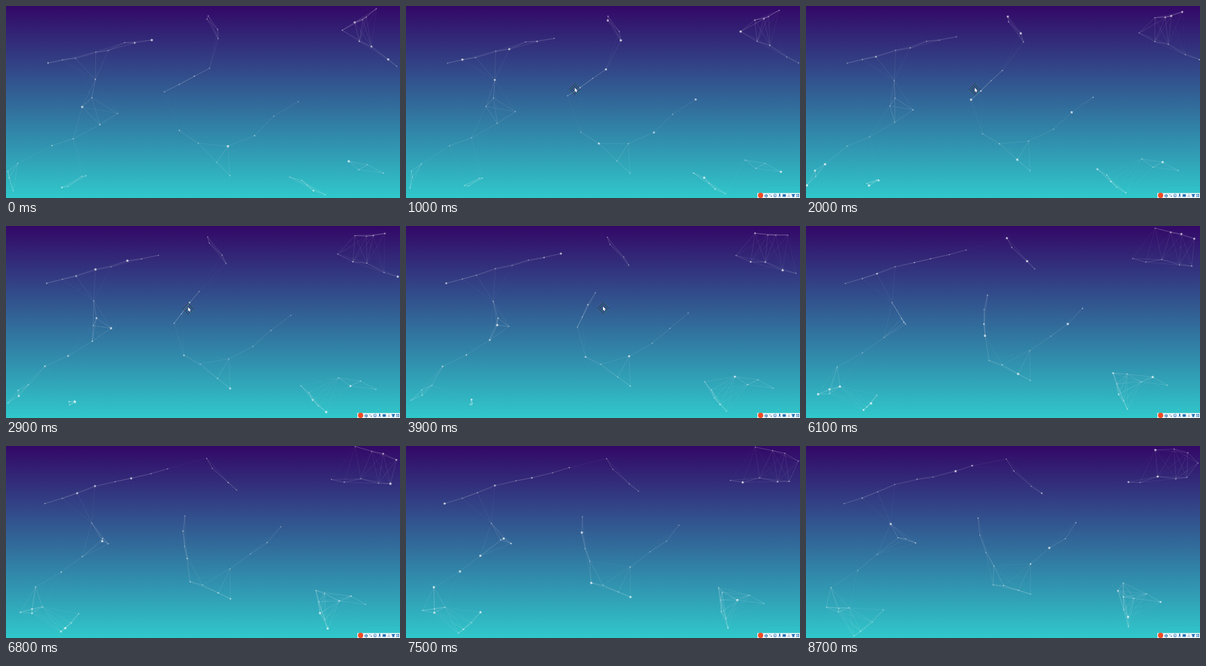
An HTML page with a canvas for the animation above (8.8 s loop, 600 by 293 pixels).

```html
<!DOCTYPE html>
<html lang="en">
<head>
<meta charset="utf-8">
<title>Constellation</title>
<style>
  html, body { margin: 0; width: 100%; height: 100%; overflow: hidden; }
  body { background: linear-gradient(#330867, #30c8cb); }
  canvas { display: block; width: 600px; height: 293px; }
</style>
</head>
<body>
<canvas id="sky" width="600" height="293"></canvas>
<script>
const W = 600, H = 293, LOOP = 8800, STEP = 100, TRAVEL = 8700;
const LINK = 74, PULSE = 4100, SCATTER = 16;
const ctx = document.getElementById('sky').getContext('2d');

let seed = 11;
const random = () => (seed = seed * 16807 % 2147483647) / 2147483647;
const mix = (a, b, k) => a + (b - a) * k;
const between = (p, q, k) => ({ x: mix(p.x, q.x, k), y: mix(p.y, q.y, k) });
const at = (x, y) => ({ x, y });

// Stars spaced along a line that drifts from one pair of end points to another;
// the inner stars stray a little from the line.
function chain(count, startA, startB, endA, endB) {
  return Array.from({ length: count }, (_, i) => {
    const k = i / (count - 1);
    const stray = SCATTER * Math.sin(Math.PI * k);
    const nudge = p => at(p.x + stray * (random() - 0.5), p.y + stray * (random() - 0.5));
    return {
      from: nudge(between(startA, startB, k)),
      to: nudge(between(endA, endB, k)),
      peak: random() * PULSE
    };
  });
}

const stars = [
  // left
  chain(8, at(64, 87), at(222, 52), at(58, 88), at(253, 30)),
  chain(3, at(136, 112), at(116, 154), at(129, 119), at(167, 148)),
  chain(4, at(170, 164), at(70, 213), at(140, 140), at(38, 216)),
  chain(4, at(18, 240), at(-11, 282), at(66, 247), at(31, 246)),
  chain(4, at(122, 259), at(85, 277), at(73, 290), at(118, 250)),
  // middle
  chain(4, at(308, 15), at(323, 50), at(305, 20), at(359, 72)),
  chain(4, at(310, 95), at(241, 131), at(262, 110), at(286, 183)),
  chain(4, at(264, 190), at(341, 259), at(285, 212), at(342, 226)),
  chain(4, at(338, 214), at(445, 146), at(342, 180), at(411, 117)),
  // right
  chain(4, at(531, 25), at(564, 4), at(532, -6), at(603, 26)),
  chain(5, at(512, 37), at(605, 92), at(491, 55), at(580, 48)),
  chain(4, at(522, 237), at(575, 255), at(475, 221), at(540, 238)),
  chain(5, at(432, 261), at(486, 288), at(483, 209), at(491, 276))
].flat();

const bounce = (v, max) => max - Math.abs(max - Math.abs(v));

function place(star, t) {
  const p = between(star.from, star.to, t / TRAVEL);
  const wave = (1 + Math.cos((t - star.peak) / PULSE * 2 * Math.PI)) / 2;
  return { x: bounce(p.x, W), y: bounce(p.y, H), glow: wave ** 5 };
}

function drawLinks(points) {
  ctx.strokeStyle = '#fff';
  ctx.lineWidth = 0.5;
  points.forEach((a, i) => {
    for (const b of points.slice(i + 1)) {
      const d = Math.hypot(a.x - b.x, a.y - b.y);
      if (d >= LINK) continue;
      ctx.globalAlpha = 0.45 * (1 - d / LINK);
      ctx.beginPath();
      ctx.moveTo(a.x, a.y);
      ctx.lineTo(b.x, b.y);
      ctx.stroke();
    }
  });
}

function drawStar({ x, y, glow }) {
  const radius = 1.2 + 1.3 * glow;
  ctx.globalAlpha = 0.45 + 0.3 * glow;
  ctx.fillStyle = '#fff';
  ctx.beginPath();
  for (let i = 0; i < 10; i++) {
    const angle = i * Math.PI / 5 - Math.PI / 2;
    const r = i % 2 ? radius * 0.5 : radius;
    ctx.lineTo(x + r * Math.cos(angle), y + r * Math.sin(angle));
  }
  ctx.fill();
}

function drawPointer(t) {
  const k = Math.min(1, Math.max(0, (t - 2000) / 1900));
  const { x, y } = between(at(257, 127), at(300, 125), k);
  const colours = ['#10131f', '#2c9a58', '#10131f', '#8a5a9c'];
  ctx.globalAlpha = 0.7;
  for (let j = -8; j <= 8; j += 2) {
    for (let i = -8; i <= 8; i += 2) {
      if (Math.hypot(i, j) > 8.3) continue;
      ctx.fillStyle = colours[(i + j + 32) / 2 % 4];
      ctx.fillRect(x + i - 0.6, y + j - 0.6, 1.2, 1.2);
    }
  }
  ctx.globalAlpha = 1;
  ctx.fillStyle = '#fff';
  ctx.fill(new Path2D(`M${x} ${y - 2}v6l1.4-1.2 1 2 1-.5-1-2h1.8z`));
}

function drawToolbar() {
  const box = (x, y, w, h) => ctx.fillRect(x, y, w, h);
  const dot = (x, y, r) => {
    ctx.beginPath();
    ctx.arc(x, y, r, 0, 7);
    ctx.fill();
  };
  ctx.globalAlpha = 1;
  ctx.fillStyle = '#f5f9fc';
  box(535, 285.5, 65, 7.5);
  ctx.fillStyle = '#f04a23';
  dot(540, 289, 4);
  ctx.fillStyle = ctx.strokeStyle = '#2373b5';
  ctx.font = 'bold 6px "Noto Sans CJK SC", "Noto Sans CJK", sans-serif';
  ctx.fillText('中', 545.5, 291.5);
  // punctuation, face, microphone, keyboard
  dot(554, 288, 0.8);
  box(555.5, 289.5, 1.5, 1.5);
  ctx.lineWidth = 0.8;
  ctx.beginPath();
  ctx.arc(562, 289.2, 2.2, 0, 7);
  ctx.stroke();
  box(561, 289.5, 2, 0.8);
  box(568, 286.5, 2, 3.5);
  box(567, 290.5, 4, 0.7);
  box(573.5, 287.2, 5, 4);
  // person, shirt, grid
  ctx.fillStyle = '#a9bccb';
  dot(583, 288, 1);
  box(581.3, 289.4, 3.5, 1.8);
  ctx.fillStyle = '#2373b5';
  box(587.3, 287, 5, 1.7);
  box(588.3, 287, 3, 4.5);
  for (const x of [594.5, 597]) {
    box(x, 287, 1.8, 1.8);
    box(x, 289.6, 1.8, 1.8);
  }
}

function draw(t) {
  ctx.globalAlpha = 1;
  ctx.clearRect(0, 0, W, H);
  const points = stars.map(star => place(star, t));
  drawLinks(points);
  points.forEach(drawStar);
  if (t >= 1000 && t < 4400) drawPointer(t);
  if (t >= 1000) drawToolbar();
}

const start = performance.now();
function tick() {
  const t = (performance.now() - start) % LOOP;
  draw(Math.floor(t / STEP) * STEP);
  requestAnimationFrame(tick);
}
tick();
</script>
</body>
</html>
```
